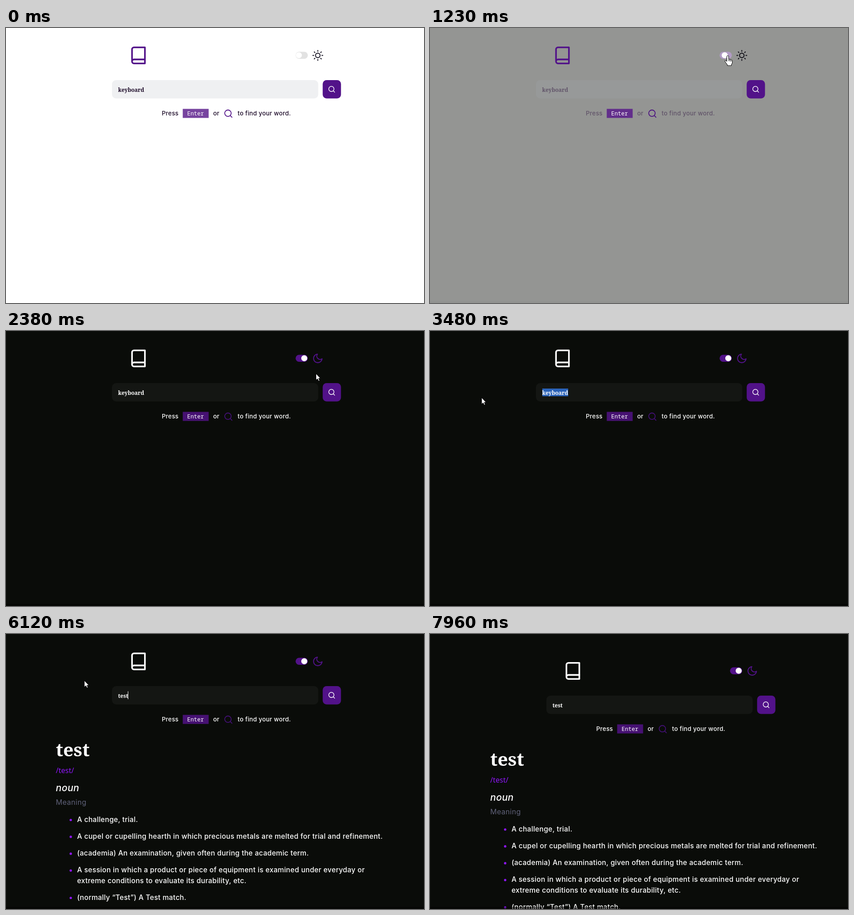
Recreate the animation shown at these times as an HTML page with a canvas. Size 923 by 607 pixels, loop 8000 ms.

```html
<!DOCTYPE html>
<html lang="en">
<head>
<meta charset="utf-8">
<title>Dictionary</title>
<style>
  html, body { margin: 0; width: 100%; height: 100%; overflow: hidden; background: #fff; }
  canvas { display: block; }
</style>
</head>
<body>
<canvas id="stage" width="923" height="607"></canvas>
<script>
const ctx = document.getElementById('stage').getContext('2d');
const LOOP = 8000;
const SANS = 'Inter, sans-serif';
const NOTO = '"Noto Sans", sans-serif';
const SERIF = '"Noto Serif", serif';
const MONO = '"Noto Sans Mono", monospace';
const PURPLE = '#521289', VIOLET = '#9016fb';

const CLICKS = [[520, 1], [1080, 0], [1470, 1]];
const ICON_SWAP = 1800, RESULT_AT = 5640;
const TYPED = [[0, 'keyboard'], [3880, 'r'], [3950, 'rea'], [4410, 'read'], [4610, 'rea'],
  [4680, 're'], [4820, 'r'], [4970, ''], [5110, 't'], [5240, 'te'], [5330, 'tes'], [5420, 'test']];
const POINTER = [[70, 830, -10], [480, 657.5, 61], [1850, 657.5, 61], [2380, 684.5, 94],
  [2500, 688, 106], [2950, 320, 130], [3270, 95, 148], [3480, 114, 147], [6050, 114, 147], [6260, 336, -20]];
const PAN = [[6600, 0, 0], [7070, 41, -171], [7400, 41, -171], [7960, 23, 21]];
const CARET = [[2950, 4100], [4400, 5500], [5920, 6460], [7000, 7530]];

const MEANINGS = [
  ['A challenge, trial.'],
  ['A cupel or cupelling hearth in which precious metals are melted for trial and refinement.'],
  ['(academia) An examination, given often during the academic term.'],
  ['A session in which a product or piece of equipment is examined under everyday or',
   'extreme conditions to evaluate its durability, etc.'],
  ['(normally “Test”) A Test match.'],
  ['The external calciferous shell, or endoskeleton, of an echinoderm, e.g. sand dollars and',
   'sea urchins.'],
  ['Testa; seed coat.'],
  ['Judgment; distinction; discrimination.']
];

const ICON = {
  book: new Path2D('M4 19.5A2.5 2.5 0 0 1 6.5 17H20M6.5 2H20V22H6.5A2.5 2.5 0 0 1 4 19.5V4.5A2.5 2.5 0 0 1 6.5 2Z'),
  search: new Path2D('M19 11A8 8 0 1 1 3 11A8 8 0 1 1 19 11M21 21L16.65 16.65'),
  moon: new Path2D('M21 12.79A9 9 0 1 1 11.21 3A7 7 0 0 0 21 12.79Z'),
  sun: new Path2D('M17 12A5 5 0 1 1 7 12A5 5 0 1 1 17 12M12 1V3M12 21V23M1 12H3M21 12H23' +
    'M4.22 4.22L5.64 5.64M18.36 18.36L19.78 19.78M4.22 19.78L5.64 18.36M18.36 5.64L19.78 4.22')
};
const ARROW = new Path2D('M0 0V14.5L3.4 11.6L5.8 16.5L8.1 15.4L5.8 10.7H10Z');
const HAND = new Path2D('M-2 1Q0-1 2 1V7.5L8 9Q10 9.6 10 12V16L8 20V22H-1V20L-6 13Q-6.5 10-4 10.5L-2 13Z');
const FINGERS = new Path2D('M2.2 8V12M4.8 9V12.5M7.4 10V13');

const clamp = v => Math.max(0, Math.min(1, v));
const lerp = (a, b, k) => a + (b - a) * k;
const ease = k => 1 - Math.pow(1 - clamp(k), 2.3);
const smooth = k => k * k * (3 - 2 * k);
// Some parts trail the page background during a theme fade.
const lag = (d, k) => d - k * d * (1 - d);

function mix(a, b, k) {
  const part = (c, i) => parseInt(c.substr(1 + 2 * i, 2), 16);
  return 'rgb(' + [0, 1, 2].map(i => Math.round(lerp(part(a, i), part(b, i), k))) + ')';
}

const inkAt = d => mix('#1c0a28', '#ffffff', lag(d, 0.55));

function along(keys, t) {
  if (t <= keys[0][0]) return keys[0].slice(1);
  for (let i = 1; i < keys.length; i++) {
    const [t0, x0, y0] = keys[i - 1], [t1, x1, y1] = keys[i];
    if (t < t1) {
      const k = smooth((t - t0) / (t1 - t0));
      return [lerp(x0, x1, k), lerp(y0, y1, k)];
    }
  }
  return keys[keys.length - 1].slice(1);
}

function darkness(t) {
  let d = 0;
  CLICKS.forEach(([at, goal], i) => {
    if (t < at) return;
    const end = i + 1 < CLICKS.length ? CLICKS[i + 1][0] : LOOP;
    d = lerp(d, goal, ease((Math.min(t, end) - at) / 500));
  });
  return d;
}

function text(s, x, y, font, color, spacing = 0) {
  ctx.font = font;
  ctx.letterSpacing = spacing + 'px';
  ctx.fillStyle = color;
  ctx.fillText(s, x, y);
}

function box(x, y, w, h, r, color) {
  ctx.fillStyle = color;
  ctx.beginPath();
  ctx.roundRect(x, y, w, h, r);
  ctx.fill();
}

function dot(x, y, r, color) {
  box(x - r, y - r, 2 * r, 2 * r, r, color);
}

function icon(path, cx, cy, scale, color) {
  ctx.save();
  ctx.translate(cx, cy);
  ctx.scale(scale, scale);
  ctx.translate(-12, -12);
  ctx.strokeStyle = color;
  ctx.lineWidth = 2;
  ctx.lineCap = ctx.lineJoin = 'round';
  ctx.stroke(path);
  ctx.restore();
}

function drawHeader(d, night) {
  const slide = lag(d, 0.4);
  icon(ICON.book, 292.5, 60.5, 1.78, night ? '#ffffff' : PURPLE);
  box(639.5, 52.5, 27, 15.5, 7.75, mix('#e2e2e2', PURPLE, slide));
  dot(lerp(646.7, 658.6, slide), 60.2, 6.6, '#fff');
  if (night) icon(ICON.moon, 688.5, 60.5, 1.05, PURPLE);
  else icon(ICON.sun, 688.5, 60.5, 1, mix('#161322', '#000000', d));
}

function drawSearch(t, d, word, error, px) {
  const ink = inkAt(d), font = '700 12px ' + SERIF;
  box(234, 115, 455.5, 40.5, 9, mix('#eff0f2', '#141613', lag(d, 0.15)));
  if (error) {
    ctx.strokeStyle = '#733030';
    ctx.lineWidth = 1.6;
    ctx.beginPath();
    ctx.roundRect(233, 114.2, 457.3, 42.2, 10);
    ctx.stroke();
    text('Word must be at least 2 characters', 234, 175, '400 11px ' + NOTO, '#ff0000');
  }
  ctx.font = font;
  ctx.letterSpacing = '0px';
  const end = 247.5 + ctx.measureText(word).width;
  const selected = t > 2950 && t < 3880;
  if (selected) {
    const from = Math.max(248, Math.min(end, px));
    box(from, 127, end - from, 17, 0, '#2a62b8');
  }
  text(word, 247.5, 140.5, font, ink);
  if (!selected && CARET.some(([a, b]) => t >= a && t < b)) box(Math.round(end - 0.5), 126.5, 1, 17.5, 0, ink);
  box(699.3, 115, 40.4, 40.5, 8.5, PURPLE);
  icon(ICON.search, 719.2, 135.2, 0.72, '#ffffff');
}

function drawHint(d, y) {
  const ink = inkAt(d), font = '500 13.4px ' + SANS;
  text('Press', 344, y + 4.5, font, ink, 0.25);
  box(390.3, y - 10, 57.2, 20, 0, mix('#77449f', '#461172', d));
  text('Enter', 400, y + 4.5, '500 12.3px ' + MONO, '#ffffff');
  text('or', 457.5, y + 4.5, font, ink, 0.25);
  icon(ICON.search, 491, y + 0.5, 0.89, mix(PURPLE, '#431075', d));
  text('to find your word.', 511.5, y + 4.5, font, ink, 0.25);
}

function drawResult() {
  text('test', 110, 270, '600 40px ' + SERIF, '#fff');
  text('/test/', 110, 307, '500 16px ' + NOTO, VIOLET);
  text('noun', 110, 347, 'italic 500 21px ' + SANS, '#fff', 0.3);
  text('Meaning', 110, 377.3, '400 16px ' + SANS, '#5f6179', 0.3);
  let y = 414.5;
  for (const lines of MEANINGS) {
    dot(143, y - 4, 2.6, VIOLET);
    lines.forEach((line, i) => text(line, 157, y + i * 23.6, '500 15.5px ' + SANS, '#fff', 0.3));
    y += 37.2 + (lines.length - 1) * 23.2;
  }
  text('Synonyms:', 110, 765.5, '600 12.4px ' + NOTO, '#66687c');
  text('examination', 195, 766, '700 14.2px ' + NOTO, VIOLET);
  text('quiz', 304.5, 766, '700 14.2px ' + NOTO, VIOLET);
}

function drawPointer(t, x, y) {
  if (t < 70 || t >= 6260) return;
  ctx.save();
  ctx.translate(x, y);
  ctx.lineWidth = 1;
  ctx.lineJoin = 'round';
  ctx.fillStyle = '#fff';
  ctx.strokeStyle = '#000';
  const inField = x > 234 && x < 689 && y > 115 && y < 155;
  const onSwitch = x > 639 && x < 667 && y > 52 && y < 69;
  if (inField) {
    ctx.strokeStyle = '#fff';
    ctx.stroke(new Path2D('M-3-8H3M0-8V8M-3 8H3'));
  } else {
    const shape = onSwitch ? HAND : ARROW;
    ctx.fill(shape);
    ctx.stroke(shape);
    if (onSwitch) ctx.stroke(FINGERS);
  }
  ctx.restore();
}

function draw(t) {
  const d = darkness(t);
  const word = TYPED.filter(([at]) => t >= at).pop()[1];
  const error = word.length < 2;
  const [px, py] = along(POINTER, t);
  const [dx, dy] = along(PAN, t);
  box(0, 0, 923, 607, 0, mix('#ffffff', '#0a0c09', d));
  ctx.save();
  ctx.translate(dx, dy);
  drawHeader(d, t >= ICON_SWAP);
  drawSearch(t, d, word, error, px);
  drawHint(d, error ? 212 : 188.5);
  if (t >= RESULT_AT) drawResult();
  ctx.restore();
  box(0, 602.5, 923, 4.5, 0, `rgba(0,0,0,${0.45 * d ** 4})`);
  drawPointer(t, px, py);
}

const start = performance.now();
function tick() {
  draw((performance.now() - start) % LOOP);
  requestAnimationFrame(tick);
}
tick();
</script>
</body>
</html>
```
